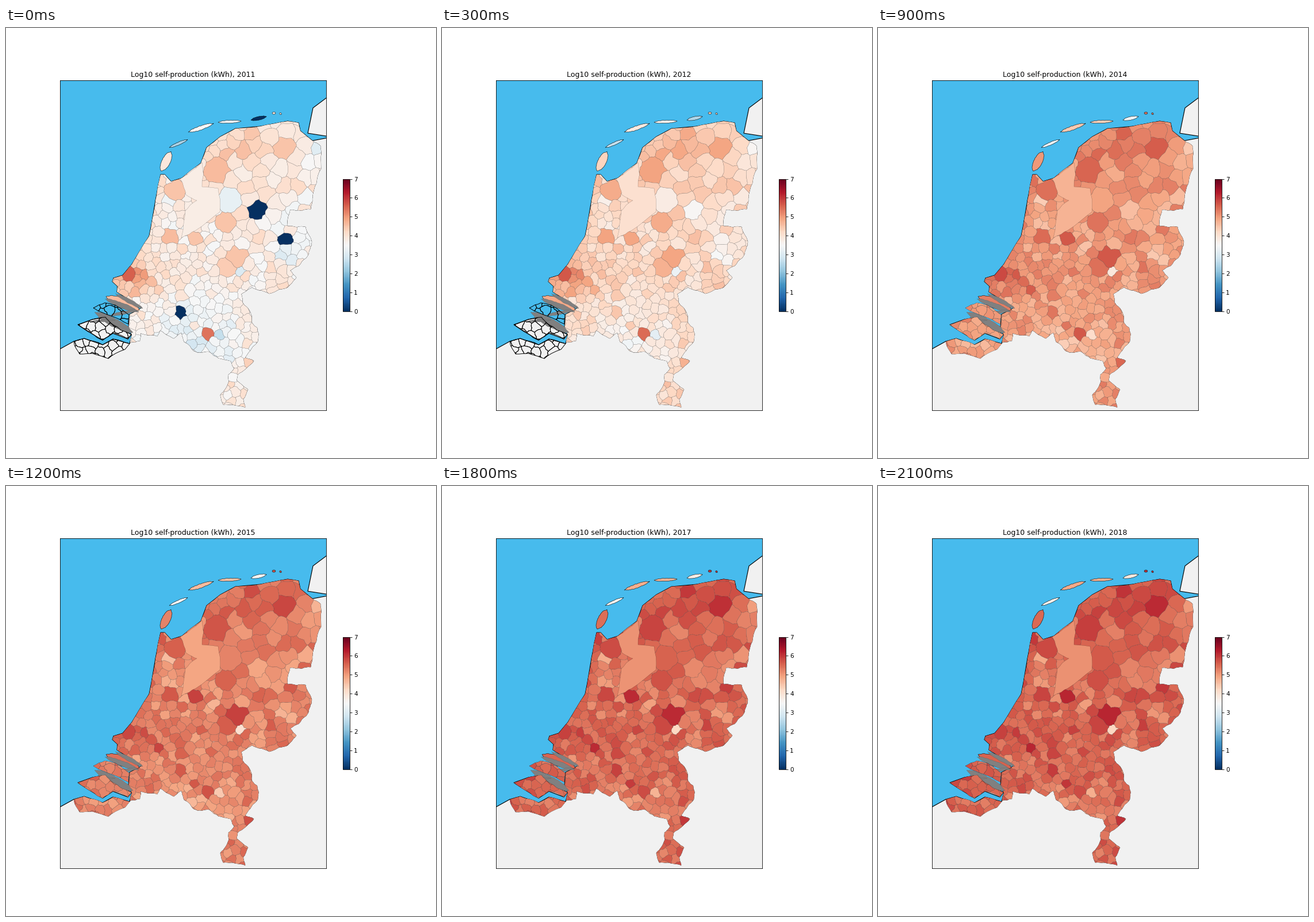
Recreate the animation shown at these times as a matplotlib script. Size 748 by 748 pixels, loop 2.6 s.

```python
import numpy as np
import matplotlib.pyplot as plt
from matplotlib.animation import FuncAnimation
from matplotlib.cm import ScalarMappable
from matplotlib.collections import PolyCollection
from matplotlib.colors import Normalize
from matplotlib.patches import PathPatch, Polygon
from matplotlib.path import Path

SEA, LAND, WATER = "#47bbed", "#f1f1f1", "#808080"
FIRST, LAST = 2011, 2018
FAINT = (0, 0, 0, 0.4)
scale = ScalarMappable(Normalize(0, 7), "RdBu_r")
rng = np.random.default_rng(11)

# Map units are stage pixels, y pointing down
fig = plt.figure(figsize=(10, 10), dpi=74.8, facecolor="white")
ax = fig.add_subplot(facecolor=SEA, aspect="equal", xticks=[], yticks=[],
                     xlim=(93.5, 557.26), ylim=(664.7, 90.7))
fig.colorbar(scale, ax=ax, shrink=0.4)


def pairs(*flat):
    return np.array(flat, float).reshape(-1, 2)


def ring(p):
    return np.vstack([p, p[:1]])


def rough(p, amp, depth=2):
    """Midpoint displacement that depends on place only, so shared borders agree."""
    for _ in range(depth):
        a, b = p[:-1], p[1:]
        mid = (a + b) / 2
        length = np.hypot(*(b - a).T)[:, None]
        noise = np.sin(mid @ pairs(12.99, 39.35, 78.23, 11.14)) * 437.5 % 1 - 0.5
        p = np.insert(p, np.arange(1, len(p)), mid + 2 * amp * noise * length, axis=0)
    return p


def spindle(x0, y0, x1, y1, width):
    """Long blob between two tips, for islands and inlets."""
    t = np.linspace(0, 1, 8)[:, None]
    tip, run = pairs(x0, y0), pairs(x1 - x0, y1 - y0)
    side = run[:, ::-1] * (1, -1) / np.hypot(*run[0]) * width / 2
    bulge = side * np.sqrt(np.sin(np.pi * t).clip(0))
    axis = tip + run * t
    return rough(np.vstack([axis + bulge, (axis - bulge)[::-1]]), 0.08)


def growth(t):
    return 1 - np.exp(-(t / 2.7) ** 1.35)


# Key points of the coast (south-west to north-east) and of the inland border back
shore = pairs(219, 534, 213, 520, 215, 498, 236, 487, 215, 473, 193, 459, 194, 449,
              185, 441, 187, 435, 203, 430, 219, 411, 249, 362, 253, 342, 260, 300,
              269, 255, 276, 255, 287, 267, 306, 261, 339, 235, 349, 208, 373, 189,
              399, 175, 443, 171, 490, 162, 509, 165, 512, 179, 533, 196)
inland = pairs(533, 196, 547, 205, 548, 245, 536, 280, 530, 315, 494, 316, 490, 345,
               521, 346, 532, 372, 522, 400, 494, 422, 505, 434, 490, 451, 458, 462,
               428, 451, 409, 463, 411, 477, 427, 500, 428, 513, 437, 522, 438, 545,
               416, 573, 431, 579, 403, 603, 401, 613, 421, 629, 413, 645, 416, 660,
               378, 655, 373, 638, 388, 615, 387, 603, 397, 592, 391, 579, 362, 570,
               354, 563, 327, 562, 310, 546, 305, 530, 292, 540, 268, 526, 263, 536,
               234, 531, 233, 544, 216, 547, 219, 534)
peninsula = pairs(125, 516, 150, 507, 173, 503, 186, 516, 218, 533, 212, 541,
                  186, 531, 168, 543, 150, 532)
flank = pairs(118, 545, 136, 540, 168, 551, 186, 541, 215, 549, 207, 559, 178, 575,
              150, 566, 128, 567)
islet = pairs(152, 487, 172, 478, 190, 482, 214, 499, 213, 515, 186, 502, 160, 492)

# Plain land under the districts
rest = pairs(570, 189, 570, 680, 80, 680, 80, 566, 118, 545, 136, 540, 168, 551,
             186, 541, 215, 549)
abroad = pairs(570, 112, 534, 139, 525, 183, 570, 190)
for p in (np.vstack([shore, rest]), abroad, peninsula):
    ax.add_patch(Polygon(p, fc=LAND, ec="black", lw=1.1))

# Named districts: x, y, radius, first and final level
districts = np.array([
    (366, 247, 21, 4.6, 5.95), (296, 281, 16, 4.5, 5.85), (388, 299, 18, 3.2, 5.7),
    (382, 340, 15, 4.5, 5.8), (329, 366, 11, 4.5, 6.2), (401, 398, 17, 4.5, 6.2),
    (384, 417, 15, 4.4, 5.9), (286, 363, 12, 4.6, 5.9), (482, 207, 14, 4.5, 6.15),
    (351, 531, 8, 5.4, 5.8), (213, 427, 11, 5.6, 5.9), (410, 425, 4, 3.0, 4.3),
    (436, 316, 11, 3.0, 5.3), (487, 368, 8, 3.0, 5.8), (305, 496, 7, 4.0, 6.0),
])
BLANK = slice(len(districts) - 3, len(districts))  # nothing reported in the first year

# Regional trends: x, y, reach, change of first and of final level
trends = [
    (330, 530, 85, -0.65, -0.1), (500, 370, 40, -0.6, 0.1), (222, 435, 34, 1.2, 0.1),
    (400, 205, 45, 0.5, 0.1), (485, 190, 36, 0.1, 0.5), (535, 225, 24, -0.4, -0.4),
    (295, 335, 40, -0.1, -0.25), (165, 535, 45, -0.7, 0.0),
]


def spacing(p):
    """Districts are small in the west and south, large in the north-east."""
    d = (p - (470, 230)) / (110, 150)
    return 11 + 9 * np.exp(-(d ** 2).sum(axis=1))


def sow():
    sites, radii = list(districts[:, :2]), list(districts[:, 2])
    seeds = rng.uniform((100, 145), (565, 675), (14000, 2))
    i = 0
    while len(seeds):
        if i == len(sites):
            sites.append(seeds[0])
            radii.append(spacing(seeds[:1])[0] / 2)
        d = np.hypot(*(seeds - sites[i]).T)
        seeds = seeds[d > radii[i] + spacing(seeds) / 2]
        i += 1
    return np.array(sites), np.array(radii)


def clip(poly, normal, limit):
    side = poly @ normal - limit
    if side.max() <= 0:
        return poly
    out = []
    for i, a in enumerate(poly):
        j = (i + 1) % len(poly)
        if side[i] <= 0:
            out.append(a)
        if side[i] * side[j] < 0:
            out.append(a + (poly[j] - a) * side[i] / (side[i] - side[j]))
    return np.array(out)


def cell(k):
    """Cell of the power diagram around one site."""
    s = sites[k]
    poly = pairs(0, 0, 748, 0, 748, 748, 0, 748)
    for j in np.argsort(np.hypot(*(sites - s).T))[1:40]:
        o = sites[j]
        poly = clip(poly, o - s, (o @ o - s @ s + radii[k] ** 2 - radii[j] ** 2) / 2)
    return rough(ring(poly), 0.18)


sites, radii = sow()
cells = [cell(k) for k in range(len(sites))]

levels = np.tile((3.9, 5.6), (len(sites), 1))
for x, y, reach, *change in trends:
    d = np.hypot(*(sites - (x, y)).T) / reach
    levels += np.exp(-d ** 2)[:, None] * change
levels += rng.normal(0, 0.2, (len(sites), 1)) + rng.normal(0, 0.06, levels.shape)
levels[:len(districts)] = districts[:, 3:]

# The enclosed lake counts as one large district
lake = pairs(303, 262, 341, 234, 341, 276, 369, 279, 372, 320, 330, 352, 305, 365,
             312, 318, 332, 300, 313, 290)
cells.append(rough(ring(lake), 0.06))
levels = np.vstack([levels, (3.75, 5.15)])

# Islands: two tips, width, first and final level
islands = np.array([
    (270, 249, 287, 215, 15, 3.9, 5.55), (284, 208, 316, 194, 5, 2.4, 3.7),
    (317, 181, 361, 166, 7, 3.5, 4.85), (369, 164, 409, 162, 5, 3.3, 4.8),
    (463, 148, 469, 148, 4, 3.9, 6.1), (476, 148, 479, 150, 3, 3.9, 6.1),
    (174, 467, 232, 490, 17, 4.6, 5.6), (426, 160, 453, 154, 6, 2.0, 3.9),
])


def layer(polys, outline=None, ec=FAINT, lw=0.35, **style):
    coll = PolyCollection(polys, edgecolors=ec, linewidths=lw, **style)
    ax.add_collection(coll, autolim=False)
    if outline:
        coll.set_clip_path(outline)
    return coll


def border(*rings):
    """Thin outline that also clips the districts inside it."""
    path = Path.make_compound_path(*[Path(r) for r in rings])
    return ax.add_patch(PathPatch(path, fc="none", ec="black", lw=0.5))


country = border(np.vstack([rough(shore, 0.02, 3), rough(inland, 0.08, 3)]))
main = layer(cells, country)
isles = layer([spindle(*row[:5]) for row in islands], ec="black", lw=0.5)

inlets = [(190, 462, 238, 488, 7), (172, 471, 231, 494, 9), (154, 494, 221, 530, 15),
          (180, 500, 228, 491, 6), (147, 510, 190, 508, 4)]
layer([spindle(*row) for row in inlets], lw=0.2, facecolors=WATER)

delta = border(*[rough(ring(p), 0.06) for p in (peninsula, flank, islet)])
near = [k for k, (x, y) in enumerate(sites) if x < 235 and y > 465]
south_west = layer([cells[k] for k in near], delta)


def colours(span, t):
    start, end = span.T
    return scale.to_rgba(start + (end - start) * growth(t))


def draw(i):
    t = min(i // 3, LAST - FIRST)
    ax.set_title(f"Log10 self-production (kWh), {FIRST + t}")
    fill, isle_fill = colours(levels, t), colours(islands[:, 5:], t)
    if t == 0:
        fill[BLANK] = isle_fill[-1] = scale.to_rgba(0)
    main.set_facecolor(fill)
    isles.set_facecolor(isle_fill)

    # The south-west reports from the third year on
    missing = t < 2
    south_west.set_facecolor("none" if missing else fill[near])
    south_west.set_edgecolor("black" if missing else FAINT)
    for part in (south_west, delta):
        part.set_linewidth(0.9 if missing else 0.4)
    return main, isles, south_west


anim = FuncAnimation(fig, draw, frames=26, interval=100, repeat=True, repeat_delay=0)
plt.show()
```
